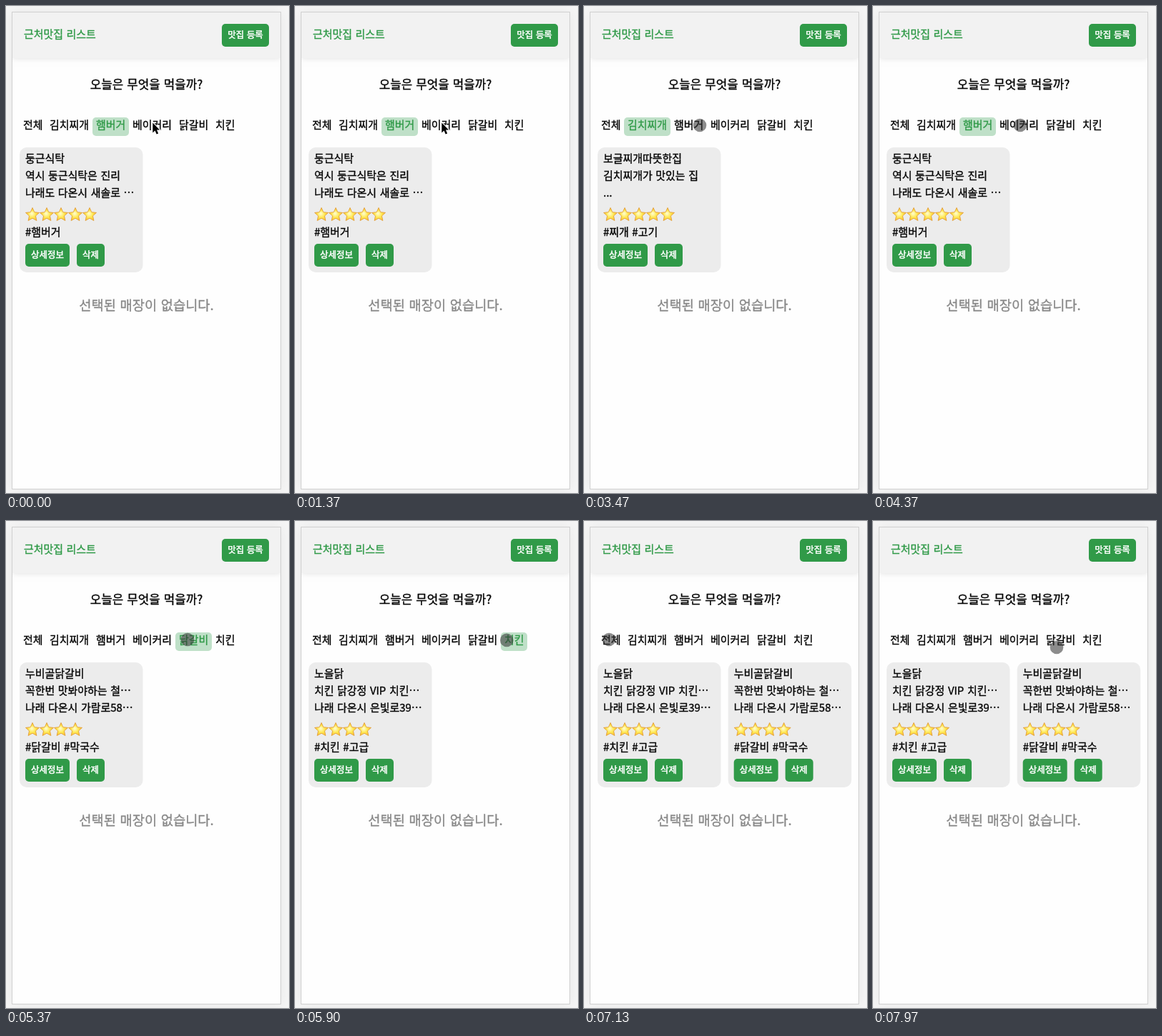
An HTML page with a canvas that plays this animation: 396 by 682 pixels, repeating every 8000 ms.

```html
<!DOCTYPE html>
<html lang="ko">
<head>
<meta charset="utf-8">
<title>근처맛집 리스트</title>
<style>
  html, body { margin: 0; width: 100%; height: 100%; overflow: hidden; background: #f6f6f6; }
  canvas { display: block; width: 396px; height: 682px; }
</style>
</head>
<body>
<canvas id="stage"></canvas>
<script>
const W = 396, H = 682, LOOP = 8000;
const GREEN = '#309a48', INK = '#050505';
const FONT = '"Noto Sans CJK KR", "Noto Sans CJK", "Noto Sans CJK JP", sans-serif';
const canvas = document.getElementById('stage');
const ctx = canvas.getContext('2d');
const dpr = window.devicePixelRatio || 1;
canvas.width = W * dpr;
canvas.height = H * dpr;

const shops = {
  burger: ['둥근식탁', '역시 둥근식탁은 진리', '나래도 다온시 새솔로 ⋯', 5, '#햄버거'],
  bakery: ['밀다방', '식빵만은 진짜 맛있는 곳', '나래 다온시 들꽃로 481', 3, '#식빵'],
  stew: ['보글찌개따뜻한집', '김치찌개가 맛있는 집', '...', 5, '#찌개 #고기'],
  galbi: ['누비골닭갈비', '꼭한번 맛봐야하는 철⋯', '나래 다온시 가람로58⋯', 4, '#닭갈비 #막국수'],
  chicken: ['노을닭', '치킨 닭강정 VIP 치킨⋯', '나래 다온시 은빛로39⋯', 4, '#치킨 #고급']
};

// label, left, width, shops listed
const tabs = [
  ['전체', 19, 37, ['chicken', 'galbi']],
  ['김치찌개', 56, 65, ['stew']],
  ['햄버거', 121, 51, ['burger']],
  ['베이커리', 172, 65, ['bakery']],
  ['닭갈비', 237, 51, ['galbi']],
  ['치킨', 288, 37, ['chicken']]
];

// time, selected tab
const clicks = [[0, 2], [1900, 3], [2800, 1], [3600, 2], [4500, 3], [5250, 4], [5700, 5], [6250, 0]];

// departure, arrival, x, y
const moves = [
  [0, 0, 205, 167], [2100, 2500, 93, 167], [3100, 3400, 162, 167], [4050, 4350, 206, 167],
  [4850, 5150, 254, 166], [5430, 5630, 318, 167], [5850, 6150, 35, 166], [7400, 7940, 257, 177]
];
const TOUCH_START = 1800;

function box(x, y, w, h, r, fill) {
  ctx.fillStyle = fill;
  ctx.beginPath();
  ctx.roundRect(x, y, w, h, r);
  ctx.fill();
}

// cy is the middle of the Hangul glyphs; the thin stroke gives a medium weight
function text(s, x, cy, size = 14.96, color = INK, align = 'left', weight = 0.35) {
  const y = cy + size * 0.34;
  ctx.font = `500 ${size}px ${FONT}`;
  ctx.wordSpacing = `${(size * 0.08).toFixed(2)}px`;
  ctx.textAlign = align;
  ctx.fillStyle = ctx.strokeStyle = color;
  ctx.lineWidth = weight;
  ctx.lineJoin = 'round';
  ctx.fillText(s, x, y);
  ctx.strokeText(s, x, y);
}

function button(label, x, y, w) {
  box(x, y, w, 32, 5, GREEN);
  text(label, x + w / 2, y + 15.6, 12.47, '#fff', 'center', 0.5);
}

function star(cx, cy) {
  ctx.beginPath();
  for (let i = 0; i < 10; i++) {
    const r = i % 2 ? 4.7 : 10;
    const a = i * Math.PI / 5 - Math.PI / 2;
    ctx.lineTo(cx + r * Math.cos(a), cy + r * Math.sin(a));
  }
  ctx.closePath();
  const gold = ctx.createRadialGradient(cx - 1, cy - 2, 1, cx, cy, 10);
  gold.addColorStop(0, '#fffbc0');
  gold.addColorStop(0.45, '#ffe750');
  gold.addColorStop(1, '#f9b52c');
  ctx.fillStyle = gold;
  ctx.fill();
  ctx.lineJoin = 'round';
  ctx.lineWidth = 0.9;
  ctx.strokeStyle = '#e2a03a';
  ctx.stroke();
}

function card([name, note, address, stars, tags], dx) {
  box(19 + dx, 198, 172.5, 175, 10, '#ececec');
  const x = 27 + dx;
  text(name, x, 213.8);
  text(note, x, 237.8);
  text(address, x, 261.8);
  for (let i = 0; i < stars; i++) star(x + 10 + i * 20, 292.5);
  text(tags, x, 316.8);
  button('상세정보', x, 333, 62);
  button('삭제', x + 72, 333, 39);
}

function page() {
  ctx.fillStyle = '#f6f6f6';
  ctx.fillRect(0, 0, W, H);
  ctx.save();
  ctx.shadowColor = 'rgba(0,0,0,.06)';
  ctx.shadowBlur = 16 * dpr;
  ctx.fillStyle = '#d0d0d0';
  ctx.fillRect(8, 8, 377, 669);
  ctx.restore();
  ctx.fillStyle = '#fefefe';
  ctx.fillRect(9, 9, 375, 667);

  ctx.save();
  ctx.beginPath();
  ctx.rect(9, 9, 375, 667);
  ctx.clip();
  ctx.shadowColor = 'rgba(0,0,0,.12)';
  ctx.shadowBlur = 8 * dpr;
  ctx.fillStyle = '#f2f2f2';
  ctx.fillRect(9, 9, 375, 64);
  ctx.restore();

  text('근처맛집 리스트', 25, 40, 14.96, GREEN);
  button('맛집 등록', 302, 25, 66);
  text('오늘은 무엇을 먹을까?', 196.5, 110.6, 16.83, INK, 'center');
  text('선택된 매장이 없습니다.', 196.5, 419.6, 18.7, '#888', 'center');
}

function tabBar(selected) {
  tabs.forEach(([label, x, w], i) => {
    const on = i === selected && i > 0;
    if (on) box(x, 156, w, 26, 5, '#bfe0c8');
    text(label, x + 5, 166.8, 14.96, on ? GREEN : INK);
  });
}

function arrow(x, y) {
  const points = [[0, 0], [0, 14], [3.2, 11], [5.4, 16], [7.8, 15], [5.7, 10], [9.8, 10]];
  ctx.beginPath();
  points.forEach(([px, py]) => ctx.lineTo(x + px, y + py));
  ctx.closePath();
  ctx.lineJoin = 'round';
  ctx.lineWidth = 2;
  ctx.strokeStyle = '#fff';
  ctx.stroke();
  ctx.fillStyle = '#000';
  ctx.fill();
}

function pointer(t) {
  if (t < TOUCH_START) return arrow(205.3, 163.5);
  let [, , x, y] = moves[0];
  for (const [start, end, toX, toY] of moves.slice(1)) {
    if (t < start) break;
    const p = Math.min(1, (t - start) / (end - start));
    const ease = p * p * (3 - 2 * p);
    x += (toX - x) * ease;
    y += (toY - y) * ease;
  }
  ctx.beginPath();
  ctx.arc(x, y, 9.3, 0, Math.PI * 2);
  ctx.fillStyle = 'rgba(50,50,50,.56)';
  ctx.fill();
}

function draw(now) {
  const t = now % LOOP;
  const selected = clicks.filter(([at]) => at <= t).pop()[1];
  ctx.setTransform(dpr, 0, 0, dpr, 0, 0);
  page();
  tabBar(selected);
  tabs[selected][3].forEach((key, i) => card(shops[key], i * 182.7));
  pointer(t);
}

const begin = performance.now();
function tick() {
  draw(performance.now() - begin);
  requestAnimationFrame(tick);
}
tick();
</script>
</body>
</html>
```
